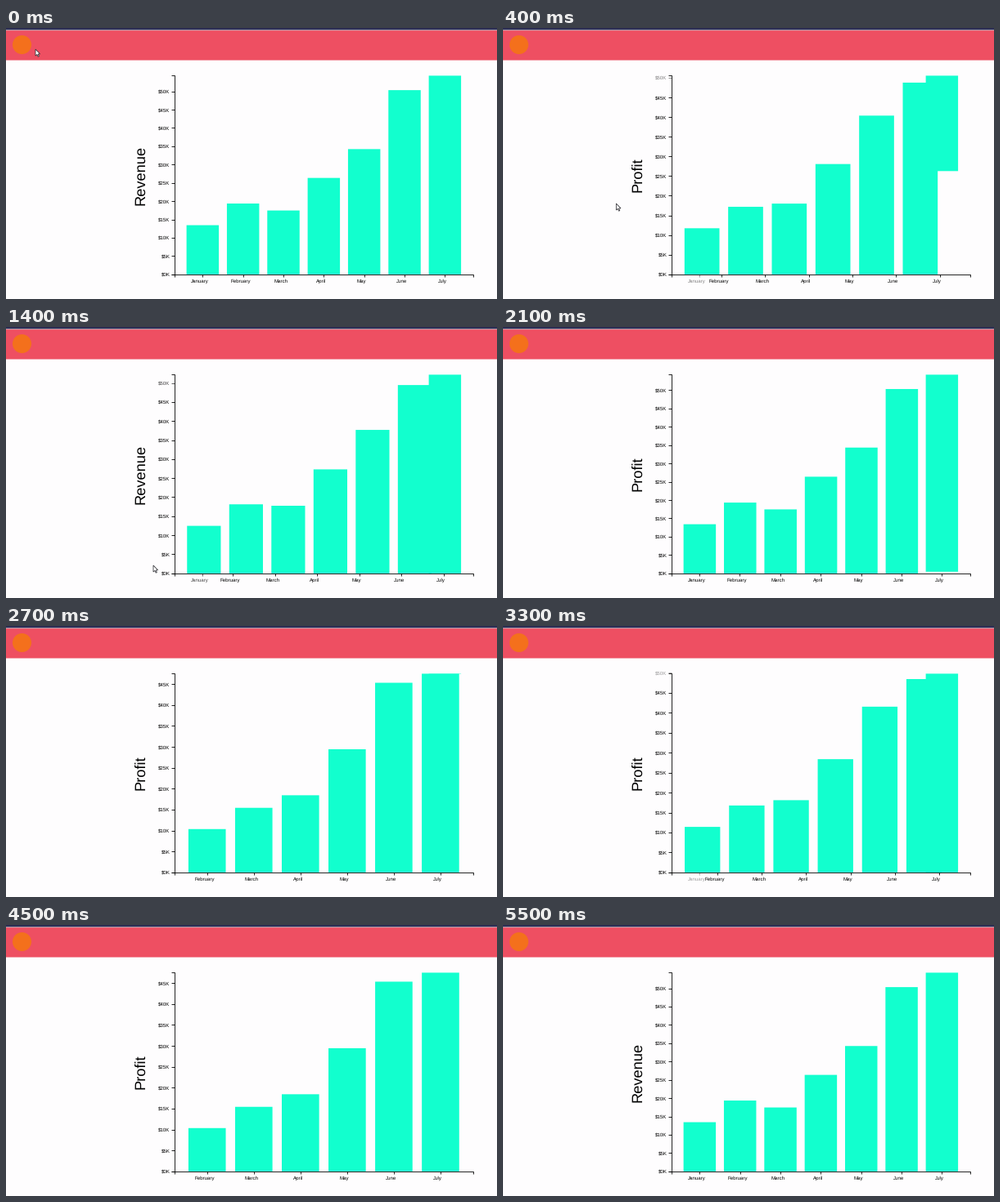
A matplotlib script that plays this animation: 600 by 332 pixels, repeating every 5.6 s.

```python
import matplotlib.pyplot as plt
from matplotlib.animation import FuncAnimation
from matplotlib.patches import Circle, Polygon, Rectangle

W, H, DPI = 600, 332, 100
FRAMES, STEP = 56, 100

LEFT, BASE, SCALE = 205.8, 301.8, 0.6085
WIDTH, HEIGHT = 600 * SCALE, 400 * SCALE
RIGHT, TOP = LEFT + WIDTH, BASE - HEIGHT

MINT, CORAL, NAVY = "#12ffce", "#ee4f62", "#2d2f55"
MONTHS = ["January", "February", "March", "April", "May", "June", "July"]
REVENUE = [13432, 19342, 17443, 26342, 34213, 50321, 54273]
PROFIT = [10342, 15423, 18432, 29434, 45343, 47492]

# (start, duration, all months shown, axis title)
UPDATES = [
    (-2000, 750, True, "Revenue"),
    (20, 750, False, "Profit"),
    (960, 750, True, "Revenue"),
    (2005, 750, False, "Profit"),
    (2960, 750, True, "Profit"),
    (3985, 510, False, "Profit"),
    (4850, 700, True, "Revenue"),
]

plt.rcParams["font.family"] = "Liberation Sans"
plt.rcParams["text.hinting"] = "none"

fig = plt.figure(figsize=(W / DPI, H / DPI), dpi=DPI)
ax = fig.add_axes([0, 0, 1, 1])


def px(n):
    return n * 72 / DPI


def mix(a, b, p):
    return a + (b - a) * p


def ease(u):
    u = min(max(u, 0), 1)
    return 4 * u ** 3 if u < 0.5 else 1 - 4 * (1 - u) ** 3


class Layout:
    """Band scale across, linear scale upward."""

    def __init__(self, months, values):
        step = WIDTH / (len(months) + 0.4)
        self.band = 0.8 * step
        self.peak = max(values)
        self.x = [LEFT + (i + 0.3) * step for i in range(len(months))]
        self.mid = {m: x + self.band / 2 for m, x in zip(months, self.x)}
        self.bars = [(x, self.y(v), self.band, BASE - self.y(v))
                     for x, v in zip(self.x, values)]
        self.ticks = range(0, self.peak, 5000)

    def y(self, v):
        return BASE - HEIGHT * v / self.peak


FULL = Layout(MONTHS, REVENUE)
SHORT = Layout(MONTHS[1:], PROFIT)


def box(x, y, w, h, color):
    ax.add_patch(Rectangle((x, y), w, h, fc=color, lw=0, snap=False))


def line(xs, ys, alpha=1):
    ax.plot(xs, ys, color="black", lw=px(0.85), alpha=alpha,
            solid_capstyle="butt", solid_joinstyle="miter")


def label(x, y, s, size=10, **kw):
    ax.text(x, y, s, fontsize=px(size * SCALE), color="black",
            va="baseline", **kw)


def draw_header():
    box(0, 0, W, 2.2, NAVY)
    box(0, 2.2, W, 0.9, "#a58a9c")
    box(0, 3.1, W, 36.4, CORAL)
    ax.add_patch(Circle((19.5, 20.5), 11.5, fc="#f4701c", lw=0))


def draw_bars(old, new, p):
    for i in range(max(len(old.bars), len(new.bars))):
        if i >= len(new.bars):
            # leaving bar shrinks toward its top edge
            x, y, w, h = old.bars[i]
            bar = (x, y, w, h * (1 - p))
        elif i >= len(old.bars):
            bar = new.bars[i]
        else:
            bar = [mix(a, b, p) for a, b in zip(old.bars[i], new.bars[i])]
        box(*bar, MINT)


def fade(key, old, new, p):
    if key in old and key in new:
        return 1
    return p if key in new else 1 - p


def draw_axes(old, new, p):
    tick = 6 * SCALE
    line([LEFT, LEFT, RIGHT, RIGHT],
         [BASE + tick, BASE, BASE, BASE + tick])
    line([LEFT - tick, LEFT, LEFT, LEFT - tick], [TOP, TOP, BASE, BASE])

    for m in MONTHS:
        alpha = fade(m, old.mid, new.mid, p)
        if alpha < 0.004:
            continue
        a = old.mid.get(m, new.mid.get(m))
        x = mix(a, new.mid.get(m, a), p)
        line([x, x], [BASE, BASE + tick], alpha)
        label(x - 3.2, BASE + 9.8, m, ha="center", alpha=alpha)

    for v in range(0, 55000, 5000):
        if v not in old.ticks and v not in new.ticks:
            continue
        alpha = fade(v, old.ticks, new.ticks, p)
        if alpha < 0.004:
            continue
        y = mix(old.y(v), new.y(v), p)
        line([LEFT - tick, LEFT], [y, y], alpha)
        label(LEFT - 5.4, y + 2.1, f"${v // 1000}K", ha="right", alpha=alpha)


def draw_cursor(t):
    if t >= 1600:
        return
    p = ease((t - 50) / 600)
    x, y = mix(36, 180, p), mix(26, 292, p)
    shape = [(0, 0), (0, 8), (1.9, 6.4), (3.2, 9.2), (4.4, 8.6),
             (3.2, 6), (5.6, 5.8)]
    ax.add_patch(Polygon([(x + a, y + b) for a, b in shape],
                         fc="white", ec="#333338", lw=px(0.8)))


def draw(i):
    t = i * STEP
    k = max(n for n, u in enumerate(UPDATES) if u[0] <= t)
    start, span, full, title = UPDATES[k]
    p = ease((t - start) / span)
    new, old = (FULL, SHORT) if full else (SHORT, FULL)

    ax.clear()
    ax.set(xlim=(0, W), ylim=(H, 0))
    ax.axis("off")
    box(0, 0, W, H, "#fefdfe")
    draw_header()
    draw_bars(old, new, p)
    draw_axes(old, new, p)
    label(LEFT - 60 * SCALE, (TOP + BASE) / 2, title, 30, rotation=90,
          ha="right", rotation_mode="default") if False else ax.text(
        LEFT - 60 * SCALE, (TOP + BASE) / 2, title, fontsize=px(30 * SCALE),
        color="black", rotation=90, rotation_mode="anchor",
        ha="center", va="baseline")
    draw_cursor(t)
    return []


anim = FuncAnimation(fig, draw, frames=FRAMES, interval=STEP,
                     init_func=lambda: [], repeat=True, repeat_delay=0)
plt.show()
```
